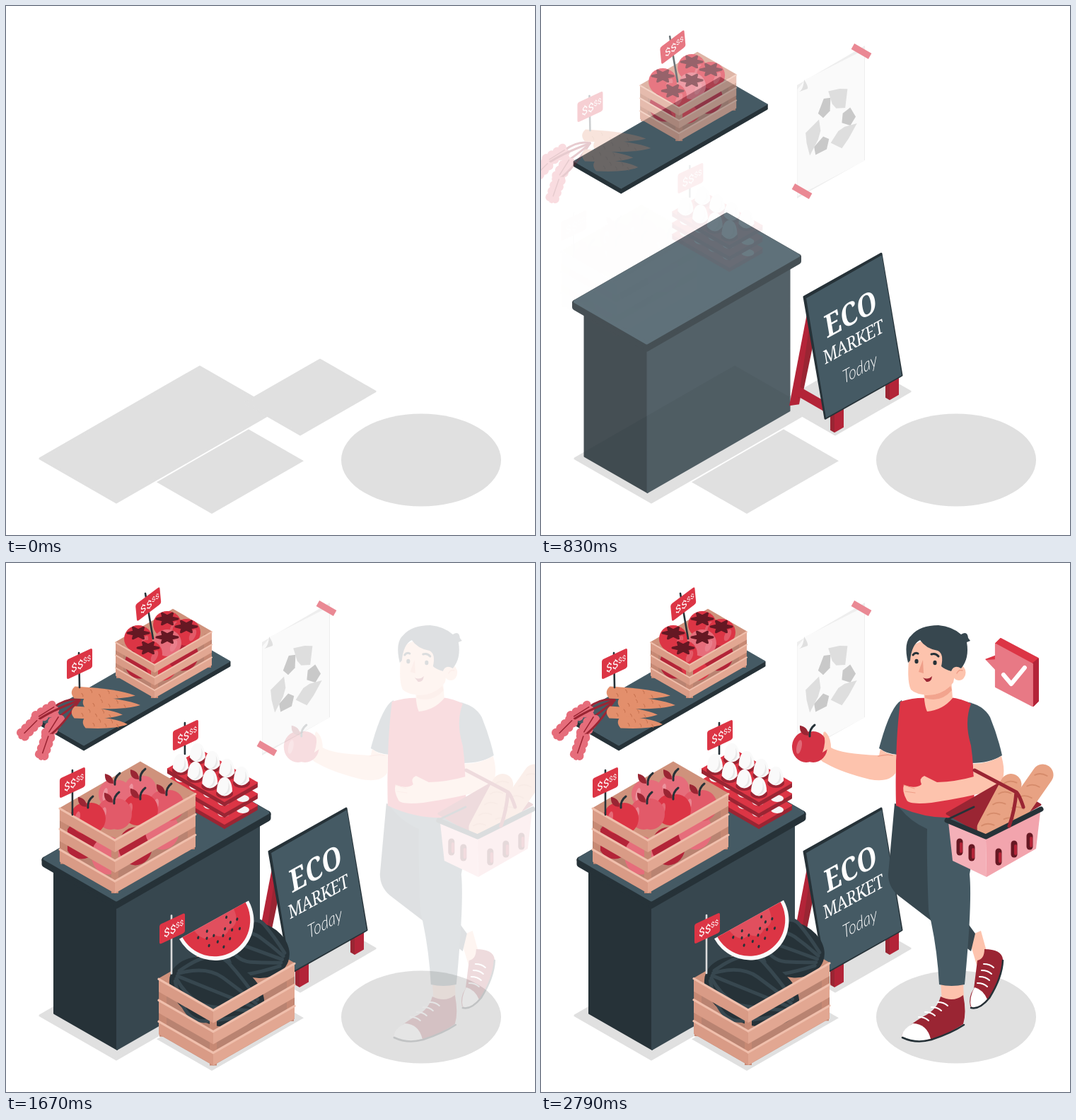
Write an HTML page that moves like this. It is 748 px wide and 748 px high and loops after 2830 ms.

```html
<!DOCTYPE html>
<html lang="en">
<head>
<meta charset="utf-8">
<title>Eco market</title>
<style>
html, body { margin: 0; width: 100%; height: 100%; overflow: hidden; background: #fff; }
svg { display: block; width: 100vw; height: 100vh; }
.price { font-family: Roboto, sans-serif; fill: #fff; }
.eco { font: bold 43px "Noto Serif", serif; fill: #fff; }
.market { font: 26px "Noto Serif", serif; letter-spacing: -.8px; fill: #fff; }
.today { font: italic 300 25px Lato, sans-serif; fill: #fff; }
</style>
</head>
<body>
<svg id="stage" viewBox="0 0 748 748"></svg>
<script>
const LOOP = 2830, HOLD = 130, SLIDE = 1000, TRAVEL = 45, ISO = .575;
const RED = '#dc3545', CRIMSON = '#b32438', DEEP = '#9a2533', WINE = '#651823', PINK = '#e66d7b', ROSE = '#f2a4ad';
const INK = '#263238', SLATE = '#37474f', STEEL = '#455a64', SKIN = '#fdc3ad', BLUSH = '#ef9f89', SHADE = '#e0e0e0';

// Basic shapes
const poly = (pts, fill, round = 0) =>
  `<polygon points="${pts}" fill="${fill}" stroke="${fill}" stroke-width="${round}" stroke-linejoin="round"/>`;
const path = (d, fill) => `<path d="${d}" fill="${fill}"/>`;
const line = (d, color, w) =>
  `<path d="${d}" fill="none" stroke="${color}" stroke-width="${w}" stroke-linecap="round" stroke-linejoin="round"/>`;
const oval = (x, y, rx, ry, fill, turn = 0) =>
  `<ellipse cx="${x}" cy="${y}" rx="${rx}" ry="${ry}" fill="${fill}" transform="rotate(${turn} ${x} ${y})"/>`;
const group = (transform, inner) => `<g transform="${transform}">${inner}</g>`;
const text = (matrix, name, word) => group(`matrix(${matrix})`, `<text class="${name}">${word}</text>`);
const repeat = (n, fn) => Array.from({ length: n }, (_, i) => fn(i)).join('');

// Isometric shapes: (x, y) is the front corner, a runs to the left, b to the right
const tile = (x, y, a, b, fill, round = 3) =>
  poly([x, y, x - a, y - a * ISO, x - a + b, y - (a + b) * ISO, x + b, y - b * ISO], fill, round);
const wall = (x, y, dx, h, fill, round = 0) => {
  const y2 = y - Math.abs(dx) * ISO;
  return poly([x, y, x + dx, y2, x + dx, y2 + h, x, y + h], fill, round);
};
const box = (x, y, a, b, h, top, left, right, round = 2) =>
  wall(x, y, -a, h, left, round) + wall(x, y, b, h, right, round) + tile(x, y, a, b, top, round);

function crate(x, y, a, b, h, step, inside) {
  const slat = (dx, dy, fill) => wall(x, y + dy, dx, h, fill) +
    line(`M${x},${y + dy + 1}l${dx},${-Math.abs(dx) * ISO}`, '#f0bfac', h / 6);
  const post = dx => poly([x + dx - 5, y - Math.abs(dx) * ISO, x + dx + 5, y - Math.abs(dx) * ISO,
    x + dx + 5, y + 2 * step + h - Math.abs(dx) * ISO, x + dx - 5, y + 2 * step + h - Math.abs(dx) * ISO], '#c78974');
  return wall(x, y, -a, 2 * step + h, '#b98371') + wall(x, y, b, 2 * step + h, '#b98371') +
    tile(x, y, a, b, '#cf927c', 0) + inside + post(6 - a) + post(b - 6) + post(0) +
    repeat(3, k => slat(-a, (2 - k) * step, '#d99b86') + slat(b, (2 - k) * step, '#e2a792'));
}

function tag(x, y, pole, color = INK, matrix = '1 -.47 0 1') {
  return line(pole, color, 2.6) + group(`matrix(${matrix} ${x} ${y})`,
    `<rect width="36" height="28" rx="3" fill="${RED}"/><text class="price" x="6" y="21" font-size="15.5">$$</text>
     <text class="price" x="23" y="16" font-size="10">$$</text>`);
}

// Scenery
const shadows = tile(156, 702, 108, 226, SHADE) + tile(416, 606, 78, 106, SHADE) +
  tile(291, 718, 78, 130, SHADE, 0) + oval(587, 642, 113, 65.5, SHADE);

const recycle = group('matrix(.8 -.42 0 1 411 166)', repeat(3, i => group(`rotate(${i * 120})`,
  poly([-24, -24, -14, -41, -2, -37, -3, -19, -15, -14], '#c9c9c9') +
  poly([-6, -48, 14, -43, 28, -37, 24, -12, 8, -18, 1, -27], '#dedede'))));
const tape = (x, y) => group(`translate(${x} ${y}) rotate(30)`, '<rect x="-14" y="-4.5" width="28" height="9" fill="#ea8994"/>');
const poster = poly([362, 112, 458, 56, 458, 218, 362, 272], '#eeeeee') +
  poly([362.5, 118, 374, 104, 457, 62, 457, 219, 362.5, 269], '#fafafa') +
  path('M363,122Q371,120 372,104Q378,113 377,117Z', SHADE) + recycle + tape(453, 64) + tape(369, 262);

const shelf = box(110, 258, 67, 207, 7, STEEL, INK, INK, 1);
const counter = box(157, 484, 89, 201, 204, INK, INK, SLATE) + box(156, 478, 101, 214, 6, INK, INK, INK, 9) +
  tile(156, 476, 101, 214, STEEL, 5);

const stand = (x, y) => box(x, y, 6, 13, 30, CRIMSON, DEEP, CRIMSON, 0);
const board = poly([376, 432, 386, 450, 365, 560, 351, 562], CRIMSON) + poly([381, 440, 388, 460, 370, 546, 364, 552], DEEP) +
  wall(402, 556, -40, 15, CRIMSON) + stand(415, 570) + stand(493, 524) +
  poly([372, 408, 481, 347, 510, 519, 402, 580], INK, 3) + poly([375, 410, 482, 349, 510, 519, 403, 579], STEEL) +
  text('.8 -.44 .17 1 404 467', 'eco', 'ECO') + text('.8 -.44 .17 1 401 504', 'market', 'MARKET') +
  text('.8 -.44 .17 1 428 531', 'today', 'Today');

// Goods
function tomato(x, y, fill) {
  const star = Array.from({ length: 12 }, (_, i) => {
    const angle = i * Math.PI / 6, d = i % 2 ? 7 : 15;
    return [x + d * Math.cos(angle), y - 8 + d * .6 * Math.sin(angle)];
  });
  return oval(x, y, 20, 19, fill) + oval(x + 9, y + 4, 4, 9, ROSE + '55', 25) + poly(star, WINE, 3);
}
const tomatoes = crate(210, 143, 55, 81, 12, 18,
  repeat(3, i => oval(190 + i * 30, 150 - Math.abs(i - .6) * 14, 22, 22, i % 2 ? RED : CRIMSON)) +
  repeat(2, i => tomato(228 - i * 41, 87 + i * 20, RED)) +
  repeat(3, i => tomato(255 - i * 27, 98 + i * 15, i == 1 ? PINK : RED))) +
  tag(183, 59, 'M197,43L208,107', INK, '.95 -.71 .08 .85');

const carrot = (x, y, n, w) => group(`translate(${x} ${y}) rotate(3)`,
  path(`M0,${-w}Q${n * .7},${-w} ${n},0Q${n * .7},${w} 0,${w}Q${-w},0 0,${-w}`, '#e38f6c') +
  repeat(5, i => line(`M${10 + i * n / 7},${i % 2 ? -w * .6 : w * .1}q3,3 2,${w * .5}`, '#c77351', 1)));
const leaf = (x, y, turn) => line(`M104,194Q${x + 20},${y - 14} ${x},${y}`, DEEP, 3) +
  group(`translate(${x} ${y}) rotate(${turn})`,
    repeat(8, i => oval((i >> 1) * 9 + 1, i % 2 ? 4.5 : -4.5, 6, 5.5, PINK)) + line('M0,0H32', PINK, 7) + line('M0,0H25', DEEP, 1.5));
const carrots = repeat(4, i => {
  const angle = (168 - i * 12) * Math.PI / 180, reach = i % 2 ? 66 : 37;
  return leaf(104 + reach * Math.cos(angle), 196 + reach * Math.sin(angle), 148 - i * 13);
}) + repeat(4, i => carrot(97 + i % 2 * 16, 183 + i * 14, 86 - i * 9, 8.5)) + tag(86, 137, 'M103,127L104,176');

const tray = y => box(308, 337 + y, 80, 46, 6, RED, DEEP, DEEP);
const egg = (x, y) => oval(x, y + 3, 12, 7, DEEP) +
  path(`M${x - 11},${y}C${x - 11},${y - 27} ${x + 11},${y - 27} ${x + 11},${y}Q${x},${y + 13} ${x - 11},${y}`, '#fafafa') +
  path(`M${x + 5},${y - 14}Q${x + 13},${y + 4} ${x - 5},${y + 6}Q${x + 8},${y + 2} ${x + 5},${y - 14}`, '#e8e8e8');
const eggs = repeat(2, k => tray(32 - k * 16) +
    repeat(4, i => oval(247 + i * 20, 320 - k * 16 + i * 11, 9, 6, '#f5f5f5')) + oval(334, 349 - k * 16, 9, 5, '#f5f5f5')) +
  tray(0) + repeat(8, i => egg((i < 4 ? 270 : 246) + i % 4 * 20.7, (i < 4 ? 275 : 290) + i % 4 * 11)) +
  tag(235, 238, 'M252,226V270');

const apple = (x, y, r, fill) =>
  oval(x - r * .2, y, r * .8, r * .88, fill) + oval(x + r * .2, y, r * .8, r * .88, fill) +
  oval(x - r * .6, y, r * .14, r * .4, '#ffffff44', 12) + line(`M${x},${y - r * .6}q-1,-10 7,-16`, INK, 3) +
  path(`M${x - 2},${y - r * .65}q-13,0 -12,-14q12,2 12,14`, DEEP);
const apples = crate(151, 391, 78, 114, 18, 29,
  repeat(4, i => oval(104 + i * 38, 418 - Math.abs(i - 1.2) * 22, 24, 27, i % 2 ? PINK : CRIMSON)) +
  repeat(2, i => apple(187 - i * 36, 321 + i * 6, 23, PINK)) +
  repeat(4, i => apple(224 - i * 37, 343 + i * 6, 25, i % 2 ? RED : '#e25a69'))) +
  tag(73, 305, 'M91,293V356');

const melon = (x, y, rx, ry, turn) => group(`translate(${x} ${y}) rotate(${turn})`, oval(0, 0, rx, ry, INK) +
  repeat(5, i => {
    const k = (i - 2) * ry * .42;
    return line(`M${-rx * .86},${k * .2}Q${-rx * .4},${k * 1.5} 0,${k * 1.15}T${rx * .82},${k * .3}`, SLATE, 5);
  }));
const slice = group('translate(294 504) rotate(-29)',
  path('M-56,0A56,58 0 0 0 56,0Z', '#fafafa') + path('M-51,0A51,52 0 0 0 51,0Z', RED) +
  path('M-32,0Q-28,24 -10,19Q0,32 12,22Q30,24 32,0Z', PINK + '77') +
  repeat(15, i => {
    const angle = .3 + i / 14 * 2.5, r = 18 + i * .618 % 1 * 24;
    return oval(r * Math.cos(angle), r * Math.sin(angle), 1.5, 2.3, INK, 45);
  }));
const melons = crate(293, 631, 77, 115, 19, 30,
  melon(352, 546, 50, 39, 20) + melon(298, 606, 70, 46, 22) + slice) + tag(217, 511, 'M234,498V580', '#dcdcdc');

// Shopper
const laces = (x, y, dx, dy) => repeat(4, i => line(`M${x + i * dx},${y + i * dy}q9,0 14,5`, '#fff', 2));
const legs =
  path('M604,528L622,520L632,556L616,568Z', SKIN) +
  path('M617,562Q627,560 627,546Q651,546 653,560Q652,585 633,616Q618,635 607,627Q604,613 612,602Z', DEEP) +
  path('M613,600Q625,603 631,617Q616,633 608,627Q605,615 613,600', '#fff') +
  line('M653,562Q652,586 634,615Q620,632 608,629', INK, 2.5) + laces(617, 594, 3, -9) +
  path('M500,340L491,440Q491,458 505,470L608,549L614,524L575,470L570,360Z', SLATE) +
  poly([565, 590, 597, 590, 598, 620, 567, 622], SKIN) +
  path('M565,613Q583,622 597,611Q602,636 597,652Q574,668 548,675Q517,681 510,668Q515,656 541,641Q560,632 565,613', DEEP) +
  path('M526,651Q546,652 551,673Q515,682 510,668Q513,658 526,651', '#fff') +
  line('M511,671Q530,680 552,674Q580,665 598,653', INK, 2.5) + laces(534, 642, 9, -7) +
  path('M504,342Q560,360 611,356Q612,410 606,440Q610,480 599,596Q580,600 563,596Q560,540 548,492Q545,410 546,376Q520,365 504,342', STEEL);

const torso =
  path('M510,194Q494,202 478,262Q489,270 504,271L514,215Z', STEEL) +
  path('M600,196Q625,200 635,218Q646,245 652,272Q635,283 608,283L596,230Z', STEEL) +
  path('M508,196Q528,190 546,191L578,190Q596,192 608,199Q598,225 608,258Q614,300 612,357Q555,368 502,343Q500,260 508,196', RED) +
  path('M541,170L580,165L582,191Q568,208 546,210Q541,200 541,170', SKIN) + path('M543,187Q564,188 579,174L581,180Q565,198 543,191Z', '#f2a48e');

const head =
  path('M522,118Q516,165 523,179Q532,188 556,186Q574,181 583,169L592,120L560,100Z', SKIN) +
  oval(591, 155, 9.5, 11, SKIN) + line('M588,156q3,-6 8,-4', BLUSH, 1.5) +
  path('M519,141Q512,112 524,102Q536,88 562,88Q582,90 594,101Q603,95 604,106L607,110L602,112Q606,135 594,149Q584,143 580,153Q570,150 566,146Q570,128 561,124Q544,121 536,109Q524,115 522,138Z', SLATE) +
  line('M526,130q3,-4 7,-2M552,129q6,-2 10,3', INK, 3) + oval(531, 139, 2.6, 3.2, INK) + oval(557, 141, 2.6, 3.2, INK) +
  path('M540,137Q535,150 534,154L541,156Z', BLUSH) + path('M540,162Q547,166 553,160Q552,169 545,168Z', DEEP);

const arms =
  path('M480,263Q490,271 502,271L502,296Q493,311 465,306Q425,296 404,284Q388,277 390,262L401,238Q410,245 410,261Q424,270 478,272Z', SKIN) +
  line('M477,273Q490,270 497,272', BLUSH, 1.5) +
  apple(380, 260, 25, '#d43345') + path('M399,239Q410,246 407,262L398,268Q404,252 399,239', SKIN) +
  path('M611,284Q635,283 651,273Q660,304 645,320Q600,332 552,339Q520,342 517,335Q510,322 513,314Q530,320 538,313Q534,304 542,301L560,310Q588,309 612,302Z', SKIN) +
  line('M513,314l15,5M515,323l14,2', BLUSH, 1.2);

const bread = (x, y, n, turn) => group(`translate(${x} ${y}) rotate(${turn})`,
  `<rect x="${-n}" y="-15" width="${2 * n}" height="30" rx="15" fill="#e8a283"/>` +
  repeat(5, i => line(`M${-n + 14 + i * n * .34},-9q8,4 9,15`, '#d58b6b', 1.8)));
const slot = (x, y) => line(`M${x},${y}v15`, WINE, 9) + line(`M${x + 2},${y + 3}v11`, CRIMSON, 4);
const basket = tile(629, 386, 55, 77, DEEP) + bread(648, 344, 50, -62) + bread(686, 333, 56, -55) +
  poly([576, 366, 629, 390, 630, 444, 582, 421], '#f4b0b8') + poly([629, 390, 706, 352, 700, 404, 630, 444], ROSE) +
  repeat(2, i => slot(592 + i * 17, 394 + i * 8)) + repeat(3, i => slot(647 + i * 22, 408 - i * 11)) +
  line('M574,364L629,387L707,348', INK, 7) + line('M574,363L612,345', INK, 3) +
  line('M613,293L672,324Q676,327 682,345M672,324Q670,350 662,372', DEEP, 5);

const bubble = group('translate(3 0)',
  poly([643, 114, 650, 107, 703, 135, 703, 195, 696, 202], RED, 2) + poly([696, 142, 703, 136, 703, 195, 696, 202], CRIMSON, 2) +
  poly([628, 136, 644, 130, 650, 150], RED) + poly([643, 115, 695, 143, 695, 202, 643, 175], '#e87985', 2) +
  poly([629, 137, 646, 136, 646, 155], '#e87985') + line('M654,158L665,171L684,148', '#fff', 6));

// Back to front; each part slides in from its side while it fades in
const parts = [
  { start: 0, art: poster },
  { start: 0, dx: -1, art: shelf },
  { start: 400, dx: -1, art: tomatoes },
  { start: 600, dx: -1, art: carrots },
  { start: 300, dx: -1, art: counter },
  { start: 700, dx: -1, art: eggs },
  { start: 800, dx: -1, art: apples },
  { start: 0, dy: -1, art: board },
  { start: 1010, dy: -1, art: melons },
  { start: 1480, dx: 1, art: legs + torso + head + arms + basket },
  { start: 1940, dx: 1, art: bubble }
];
const stage = document.getElementById('stage');
stage.innerHTML = shadows + parts.map(part => `<g>${part.art}</g>`).join('');
const layers = stage.querySelectorAll(':scope > g');

// cubic-bezier(.333, 0, .458, 1.4): slow start, slight overshoot
function ease(x) {
  if (x <= 0) return 0;
  if (x >= 1) return 1;
  const curve = (s, a, b) => 3 * (1 - s) * (1 - s) * s * a + 3 * (1 - s) * s * s * b + s * s * s;
  let low = 0, high = 1;
  for (let i = 0; i < 24; i++) {
    const mid = (low + high) / 2;
    if (curve(mid, .333, .458) < x) low = mid; else high = mid;
  }
  return curve(low, 0, 1.4);
}

function draw() {
  const time = performance.now() % LOOP;
  parts.forEach(({ start, dx = 0, dy = 0 }, i) => {
    const p = time < HOLD ? 0 : ease((time - start) / SLIDE), offset = TRAVEL * (1 - p);
    layers[i].setAttribute('transform', `translate(${dx * offset} ${dy * offset})`);
    layers[i].setAttribute('opacity', Math.min(1, p));
  });
  requestAnimationFrame(draw);
}
draw();
</script>
</body>
</html>
```
